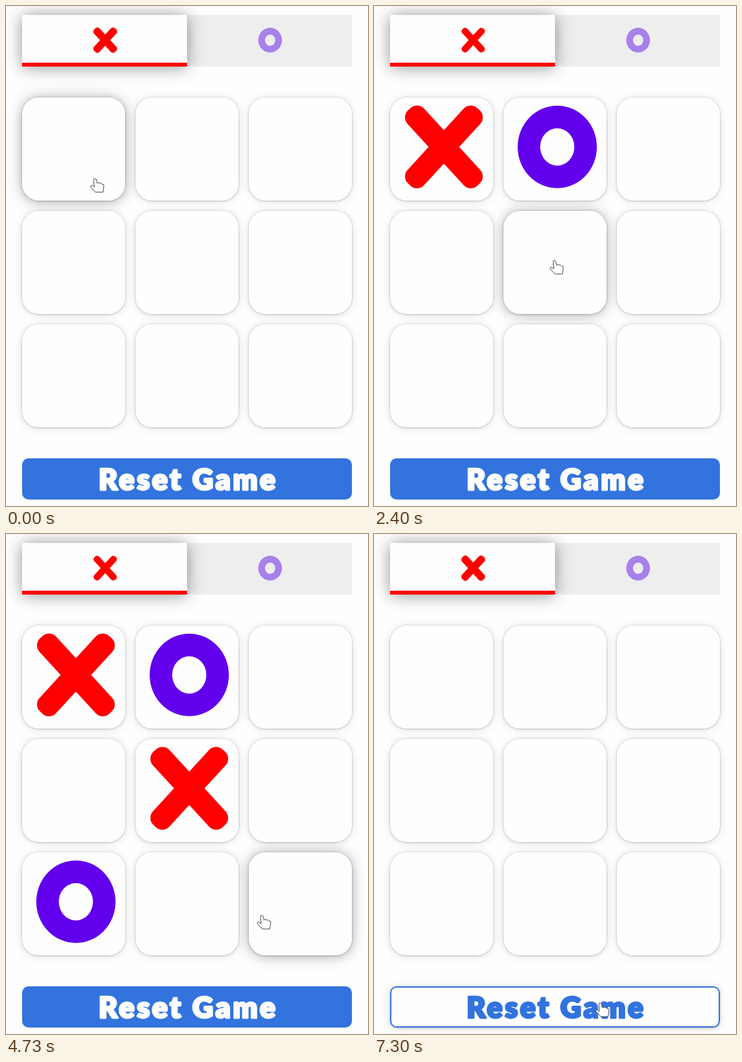
Recreate the animation shown at these times as an HTML page with a canvas. Size 562 by 776 pixels, loop 7.33 s.

```html
<!DOCTYPE html>
<html lang="en">
<head>
<meta charset="utf-8">
<title>Noughts and crosses</title>
<style>
html, body { margin: 0; width: 100%; height: 100%; overflow: hidden; background: #fefefe; }
canvas { display: block; }
</style>
</head>
<body>
<canvas id="stage" width="562" height="776"></canvas>
<script>
const ctx = document.getElementById('stage').getContext('2d');
const LOOP = 7330, CELL = 160, PITCH = 176, LEFT = 25, TOP = 142;
const PAPER = '#fefefe', TAB = '#eeeeee';
const WHITE = [254, 254, 254], BLUE = [50, 115, 222];
const RED = [255, 0, 0], RED_DIM = [241, 130, 130];
const PURPLE = [98, 0, 238], PURPLE_DIM = [168, 128, 236], PURPLE_LOST = [174, 128, 244];
const BUTTON = [25, 702, 512, 64];

// click time and cell; X and O alternate
const moves = [[450, 0], [1950, 1], [2720, 4], [4180, 6], [4920, 8]];
const WIN = 4920, RESET = 6450, winners = [0, 4, 8];

// time, x, y of the pointer tip
const path = [
  [0, 139, 268], [520, 139, 266], [860, 270, 350], [1130, 369, 343], [1420, 372, 300],
  [1640, 392, 246], [1880, 292, 232], [2000, 290, 232], [2400, 281, 395], [2950, 283, 398],
  [3330, 355, 469], [3560, 420, 530], [3800, 290, 575], [4080, 108, 580], [4230, 110, 580],
  [4520, 388, 586], [4730, 398, 592], [4880, 420, 596], [5150, 420, 598], [5670, 396, 682],
  [6050, 352, 728], [LOOP, 352, 728]
];

const hand = new Path2D('M-3 1Q-1 -2 1 1L2.5 7Q4 5.5 6 7Q9 6 10 8.5Q13 8 13 11L11.5 21H0L-7.5 13Q-8.5 10 -5 10.5L-2 13Z');
const arrow = new Path2D('M0 0V17L4 16L7 21L10 19.5L8.5 14.5L12.5 13Z');

const rgb = c => `rgb(${c.join()})`;
const mix = (a, b, k) => rgb(a.map((v, i) => Math.round(v + (b[i] - v) * k)));
const isWon = t => t >= WIN && t < RESET;

function pointer(t) {
  if (t <= 0) return path[0].slice(1);
  const i = Math.max(1, path.findIndex(p => p[0] >= t));
  const [t0, x0, y0] = path[i - 1], [t1, x1, y1] = path[i];
  const u = (t - t0) / (t1 - t0), k = u * u * (3 - 2 * u);
  return [x0 + (x1 - x0) * k, y0 + (y1 - y0) * k];
}

function markAt(cell, t) {
  const i = t < RESET ? moves.findIndex(m => m[1] === cell && m[0] <= t) : -1;
  return i < 0 ? '' : 'XO'[i % 2];
}

function turn(t) {
  if (t >= WIN) return 'X';
  return 'XO'[moves.filter(m => m[0] <= t).length % 2];
}

// index of the clickable thing under the pointer: 0-8 cells, 9 button, -1 none
function hot(t) {
  const [x, y] = pointer(t);
  if (x >= 25 && x <= 537 && y >= 702 && y <= 766) return 9;
  const c = Math.floor((x - LEFT) / PITCH), r = Math.floor((y - TOP) / PITCH);
  if (c < 0 || c > 2 || r < 0 || r > 2 || isWon(t)) return -1;
  if (x - LEFT - c * PITCH > CELL || y - TOP - r * PITCH > CELL) return -1;
  return markAt(r * 3 + c, t) ? -1 : r * 3 + c;
}

// share of the recent past in which a test held: a linear transition
function eased(t, test) {
  let n = 0;
  for (let k = 0; k < 10; k++) n += test(t - k * 16) ? 1 : 0;
  return n / 10;
}

function box(x, y, w, h, r) {
  ctx.beginPath();
  ctx.roundRect(x, y, w, h, r);
  ctx.fill();
}

function glow(rect, blur, shade, dy, alpha) {
  if (alpha <= 0) return;
  ctx.save();
  ctx.globalAlpha = alpha;
  ctx.shadowBlur = blur;
  ctx.shadowColor = `rgba(0,0,0,${shade})`;
  ctx.shadowOffsetY = dy;
  ctx.fillStyle = PAPER;
  box(...rect);
  ctx.restore();
}

function soft(rect, alpha) {
  glow(rect, 14, 0.12, 1, alpha);
  glow(rect, 3, 0.3, 0.5, alpha);
}

const strong = (rect, alpha) => glow(rect, 24, 0.42, 1, alpha);

function mark(kind, x, y, scale, color, bold) {
  ctx.save();
  ctx.translate(x, y);
  ctx.scale(scale, scale);
  ctx.fillStyle = color;
  if (kind === 'X') {
    const w = bold ? 39 : 35;
    for (const s of [-1, 1]) {
      ctx.save();
      ctx.rotate(s * 47.5 * Math.PI / 180);
      box(-79.5, -w / 2, 159, w, 15);
      ctx.restore();
    }
  } else {
    ctx.beginPath();
    ctx.ellipse(0, 0, 61.5, 64, 0, 0, 7);
    ctx.ellipse(0, 0, 26.5, 29, 0, 0, 7);
    ctx.fill('evenodd');
  }
  ctx.restore();
}

function label(text, x, y, color, spacing, weight) {
  ctx.font = '900 45px Lato, "Open Sans", sans-serif';
  ctx.letterSpacing = spacing + 'px';
  ctx.textAlign = 'center';
  ctx.fillStyle = ctx.strokeStyle = color;
  ctx.lineWidth = weight;
  ctx.lineJoin = 'round';
  ctx.fillText(text, x + spacing / 2, y);
  ctx.strokeText(text, x + spacing / 2, y);
}

function drawTabs(t) {
  const fresh = t < moves[0][0] || t >= RESET;
  const tabs = [
    { kind: 'X', x: 25, line: 6, on: RED, off: RED_DIM },
    { kind: 'O', x: 281, line: 4, on: PURPLE, off: PURPLE_DIM }
  ];
  ctx.fillStyle = TAB;
  ctx.fillRect(25, 14, 512, 80);
  for (const tab of tabs) {
    const lit = eased(t, s => turn(s) === tab.kind);
    const raised = eased(t, s => turn(s) === tab.kind && !isWon(s));
    strong([tab.x, 14, 256, 80, 0], raised);
    ctx.globalAlpha = lit;
    ctx.fillStyle = PAPER;
    ctx.fillRect(tab.x, 14, 256, 80);
    ctx.globalAlpha = raised;
    ctx.fillStyle = rgb(tab.on);
    ctx.fillRect(tab.x, 94 - tab.line, 256, tab.line);
    ctx.globalAlpha = 1;
    tab.color = mix(tab.off, tab.on, lit);
  }
  if (isWon(t)) {
    label('WINNER', 154.5, 70, tabs[0].color, 0.5, 4);
    label('LOSER', 410, 70, tabs[1].color, 2.5, 4);
  } else {
    for (const tab of tabs) mark(tab.kind, tab.x + 129, 53, 0.3, tab.color, fresh);
  }
}

function drawBoard(t) {
  const faded = eased(t, isWon);
  const cells = [...Array(9).keys()].map(i => ({
    i,
    rect: [LEFT + i % 3 * PITCH, TOP + Math.floor(i / 3) * PITCH, CELL, CELL, 26],
    fade: winners.includes(i) ? 0 : faded
  }));
  for (const c of cells) {
    soft(c.rect, 1 - c.fade * 0.5);
    strong(c.rect, 0.6 * eased(t, s => hot(s - 60) === c.i));
  }
  for (const c of cells) {
    ctx.fillStyle = PAPER;
    box(...c.rect);
    const kind = markAt(c.i, t);
    const color = kind === 'X' ? rgb(RED) : mix(PURPLE, PURPLE_LOST, c.fade);
    if (kind) mark(kind, c.rect[0] + 83.5, c.rect[1] + 76.7, 1, color);
  }
}

function drawButton(t) {
  const over = eased(t, s => hot(s) === 9);
  soft([...BUTTON, 10], over);
  ctx.fillStyle = rgb(BLUE);
  box(...BUTTON, 10);
  ctx.globalAlpha = over;
  ctx.fillStyle = PAPER;
  box(27, 704, 508, 60, 8);
  ctx.globalAlpha = 1;
  label('Reset Game', 281, 750.5, mix(WHITE, BLUE, over), 3.6, 3);
}

function drawPointer(t) {
  const shape = hot(t - 60) >= 0 ? hand : arrow;
  ctx.save();
  ctx.translate(...pointer(t));
  ctx.fillStyle = PAPER;
  ctx.strokeStyle = '#444';
  ctx.lineWidth = 1;
  ctx.fill(shape);
  ctx.stroke(shape);
  ctx.restore();
}

function draw(t) {
  ctx.fillStyle = PAPER;
  ctx.fillRect(0, 0, 562, 776);
  drawTabs(t);
  drawBoard(t);
  drawButton(t);
  drawPointer(t);
}

const start = performance.now();
function tick() {
  draw((performance.now() - start) % LOOP);
  requestAnimationFrame(tick);
}
draw(0);
requestAnimationFrame(tick);
</script>
</body>
</html>
```
